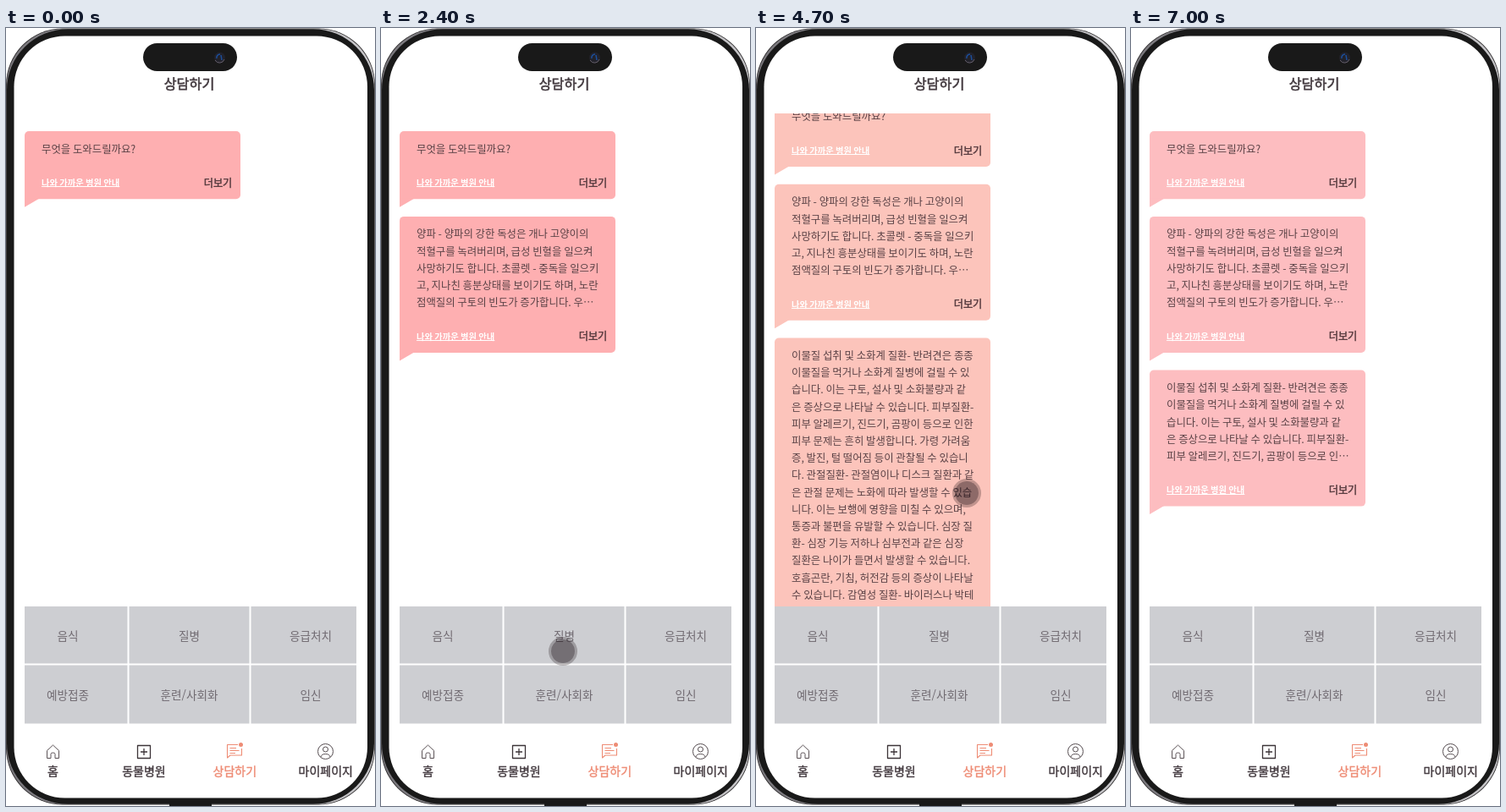
Recreate the animation shown at these times as an HTML page with a canvas. Size 436 px wide and 920 px high, loop 7.1 s.

```html
<!DOCTYPE html>
<html lang="ko">
<head>
<meta charset="utf-8">
<title>상담하기</title>
<style>
html, body { margin: 0; width: 100%; height: 100%; overflow: hidden; background: #fff; }
canvas { display: block; width: 436px; height: 920px; }
</style>
</head>
<body>
<canvas id="stage" width="436" height="920"></canvas>
<script>
const LOOP = 7100, STEP = 100, FADE = 300;
const W = 436, H = 920;
const VIEW = { x: 10, y: 101, w: 416, h: 583 };
const FONT = '"Noto Sans CJK KR", "Noto Sans KR", "Noto Sans CJK", sans-serif';
const INK = '#443b40', ACCENT = '#ee8c75', CELL = '#cdced2', BEZEL = '#191919';
const PINK = '#feafb1', SALMON = '#fcc4bb', PALE = '#fdbdc0';

const stage = document.getElementById('stage').getContext('2d');
const layer = document.createElement('canvas');
layer.width = W;
layer.height = H;
const sheet = layer.getContext('2d');

const HELLO = ['무엇을 도와드릴까요?'];
const FOOD = [
  '양파 - 양파의 강한 독성은 개나 고양이의',
  '적혈구를 녹려버리며, 급성 빈혈을 일으켜',
  '사망하기도 합니다. 초콜렛 - 중독을 일으키',
  '고, 지나친 흥분상태를 보이기도 하며, 노란',
  '점액질의 구토의 빈도가 증가합니다. 우…'
];
const ILLNESS = [
  '이물질 섭취 및 소화계 질환- 반려견은 종종',
  '이물질을 먹거나 소화계 질병에 걸릴 수 있',
  '습니다. 이는 구토, 설사 및 소화불량과 같',
  '은 증상으로 나타날 수 있습니다. 피부질환-',
  '피부 알레르기, 진드기, 곰팡이 등으로 인한',
  '피부 문제는 흔히 발생합니다. 가령 가려움',
  '증, 발진, 털 떨어짐 등이 관찰될 수 있습니',
  '다. 관절질환- 관절염이나 디스크 질환과 같',
  '은 관절 문제는 노화에 따라 발생할 수 있습',
  '니다. 이는 보행에 영향을 미칠 수 있으며,',
  '통증과 불편을 유발할 수 있습니다. 심장 질',
  '환- 심장 기능 저하나 심부전과 같은 심장',
  '질환은 나이가 들면서 발생할 수 있습니다.',
  '호흡곤란, 기침, 허전감 등의 증상이 나타날',
  '수 있습니다. 감염성 질환- 바이러스나 박테',
  '리아에 의한 감염은 발생할 수 있으며, 이로',
  '인한 열, 기침, 토 등의 증상이 나타날 수 있',
  '습니다. 이러한 질병을 예방하고 관리하기',
  '위해서는 정기적인 건강 검진, 규칙적인 예',
  '방접종, 올바른 식이 및 적절한 운동이 중요',
  '합니다. 주인의 주의와 관심을 통해 동물의',
  '행동 변화나 이상 징후를 빠르게 감지하여',
  '즉각적인 치료가 이루어지도록 하는 것이',
  '중요합니다.'
];
const ILLNESS_SHORT = [...ILLNESS.slice(0, 4), ILLNESS[4].replace('한', '…')];

const STATES = [
  { at: 0, chats: [HELLO], pink: PINK },
  { at: 1200, chats: [HELLO, FOOD], pink: PINK },
  { at: 2600, chats: [HELLO, FOOD, ILLNESS_SHORT], pink: PINK },
  { at: 4500, chats: [HELLO, FOOD, ILLNESS], pink: SALMON },
  { at: 5900, chats: [HELLO, FOOD, ILLNESS_SHORT], pink: PALE }
];

const easeOut = p => 1 - (1 - p) ** 3;
const easeInOut = p => p * p * (3 - 2 * p);

const POINTER = [
  { from: 100, to: 1000, pos: [73, 738] },
  { from: 1750, to: 2400, pos: [215, 737] },
  { from: 2900, to: 4300, pos: [249, 550] },
  { from: 5200, to: 5700, pos: [257, 632] },
  { from: 6450, to: 6900, pos: [339, 873] }
];
const SCROLL = [
  { from: 4600, to: 4900, pos: [147] },
  { from: 5000, to: 5600, pos: [287] }
];

function glide(moves, begin, t, ease) {
  return moves.reduce((at, { from, to, pos }) => {
    const p = ease(Math.min(1, Math.max(0, (t - from) / (to - from))));
    return at.map((v, i) => v + (pos[i] - v) * p);
  }, begin);
}

// y is the vertical middle of the glyphs; bold is extra stroke width
function text(c, str, x, y, size, color, { bold = 0, weight = 400, align = 'left' } = {}) {
  c.font = `${weight} ${size}px ${FONT}`;
  c.fillStyle = c.strokeStyle = color;
  c.textAlign = align;
  c.fillText(str, x, y + size * 0.37);
  if (!bold) return;
  c.lineWidth = bold;
  c.lineJoin = 'round';
  c.strokeText(str, x, y + size * 0.37);
}

function box(c, x, y, w, h, r, color) {
  c.fillStyle = color;
  c.beginPath();
  c.roundRect(x, y, w, h, r);
  c.fill();
}

function stroke(c, d, color, width = 1) {
  c.strokeStyle = color;
  c.lineWidth = width;
  c.stroke(new Path2D(d));
}

function disc(c, x, y, r, color) {
  c.fillStyle = color;
  c.beginPath();
  c.arc(x, y, r, 0, Math.PI * 2);
  c.fill();
}

function bubble(c, top, lines, pink) {
  const h = 60 + lines.length * 20.2, end = top + h;
  box(c, 22, top, 255, h, [5, 5, 5, 0], pink);
  c.beginPath();
  c.moveTo(22, end - 1);
  c.lineTo(22, end + 9.5);
  c.lineTo(40, end - 1);
  c.fill();
  lines.forEach((line, i) => text(c, line, 42, top + 21 + i * 20.2, 12.4, '#5a4246'));
  const link = '나와 가까운 병원 안내';
  text(c, link, 42, end - 19, 10.3, '#fff', { weight: 700 });
  c.fillRect(42, Math.round(end - 15), c.measureText(link).width, 1);
  const action = lines === ILLNESS ? '접기' : '더보기';
  text(c, action, 267.3, end - 19, 12.2, '#54393d', { bold: 0.45, align: 'right' });
  return end;
}

function list(state, scroll) {
  sheet.fillStyle = '#fff';
  sheet.fillRect(0, 0, W, H);
  let y = 122 - (state.chats.includes(ILLNESS) ? scroll : 0);
  for (const lines of state.chats) y = bubble(sheet, y, lines, state.pink) + 20.7;
}

function blit(alpha) {
  const { x, y, w, h } = VIEW;
  stage.globalAlpha = alpha;
  stage.drawImage(layer, x, y, w, h, x, y, w, h);
  stage.globalAlpha = 1;
}

function chat(t) {
  const i = STATES.findLastIndex(s => s.at <= t);
  const p = i ? Math.min(1, (t - STATES[i].at + STEP) / FADE) : 1;
  const [scroll] = glide(SCROLL, [0], t, easeInOut);
  const now = { ...STATES[i] };
  if (now.pink === SALMON && t >= 5100) now.pink = PINK;
  if (p < 1) {
    list(STATES[i - 1], scroll);
    blit(1);
  }
  list(now, scroll);
  blit(p);
}

function phone() {
  const c = stage;
  c.fillStyle = '#fff';
  c.fillRect(0, 0, W, H);
  box(c, 0, 0.5, W, 918, 67, '#2a2829');
  // wider radii inside leave a metal sliver at each corner
  const metal = c.createLinearGradient(0, 0, W, 0);
  metal.addColorStop(0, '#77757a');
  metal.addColorStop(1, '#c9c8cb');
  box(c, 0.7, 1, W - 1.4, 917, 67, metal);
  box(c, 1, 1.3, W - 2, 916.5, 72, BEZEL);
  box(c, 9.5, 9.5, 417.5, 901, 60, '#fff');
  c.fillStyle = BEZEL;
  c.fillRect(193, 917, 50, 3);

  box(c, 162, 18, 111, 33, 16.5, BEZEL);
  disc(c, 252.5, 35, 6.5, '#22222a');
  stroke(c, 'M249 36a4 4 0 0 1 4-5M254 32l1 6', '#1b4f9c', 1.5);
  stroke(c, 'M247 38a6 6 0 0 0 11-1', '#66606c');
  text(c, '상담하기', 216.5, 66.5, 16.2, INK, { bold: 0.6, align: 'center' });
}

function menu() {
  const c = stage;
  const names = ['음식', '질병', '응급처치', '예방접종', '훈련/사회화', '임신'];
  c.fillStyle = CELL;
  c.fillRect(22, 684, 392, 138.5);
  c.fillStyle = '#fff';
  c.fillRect(22, 751.5, 392, 2);
  for (const x of [143.5, 287.5]) c.fillRect(x, 684, 2, 139);
  names.forEach((name, i) =>
    text(c, name, 73 + i % 3 * 143.5, i < 3 ? 719 : 789, 13.6, '#706a71', { align: 'center' }));
}

function tabs() {
  const c = stage;
  stroke(c, 'M48.5 854.5L55.5 848L62.5 854.5V863.5H58V858.5Q58 857 55.5 857Q53 857 53 858.5V863.5H48.5Z', '#5b5256');
  stroke(c, 'M155.5 848.5h15v15h-15ZM163 852v8M159 856h8', '#3c3438', 1.3);
  stroke(c, 'M274 847.5H261.5V863L265 860H278.5V852M264.5 851.5h7.5M264.5 854.5h11M264.5 857.5h6.5', ACCENT, 1.1);
  disc(c, 277.5, 847.5, 2.5, ACCENT);
  stroke(c, 'M386.5 855.5a9 9 0 1 1-18 0a9 9 0 1 1 18 0M380.5 853a3 3 0 1 1-6 0a3 3 0 1 1 6 0M372 862q.5-3.5 5.5-3.5t5.5 3.5', '#554c50');
  ['홈', '동물병원', '상담하기', '마이페이지'].forEach((name, i) =>
    text(c, name, 55.5 + i * 107.4, 878.5, 14, name === '상담하기' ? ACCENT : INK, { bold: 0.4, align: 'center' }));
}

function pointer(t) {
  if (t < 100 || t > 6900) return;
  const [x, y] = glide(POINTER, [345, 845], t, easeOut);
  const warm = t < 1200;
  disc(stage, x, y, 14, warm ? 'rgba(155,106,18,.6)' : 'rgba(18,4,10,.47)');
  stage.strokeStyle = warm ? 'rgba(235,142,62,.5)' : 'rgba(18,4,10,.25)';
  stage.lineWidth = 3;
  stage.beginPath();
  stage.arc(x, y, 15.5, 0, Math.PI * 2);
  stage.stroke();
}

function draw(now) {
  const t = Math.floor((now % LOOP) / STEP) * STEP;
  phone();
  chat(t);
  menu();
  tabs();
  pointer(t);
}

let start;
function tick(now) {
  start ??= now;
  draw(now - start);
  requestAnimationFrame(tick);
}
draw(0);
requestAnimationFrame(tick);
</script>
</body>
</html>
```
